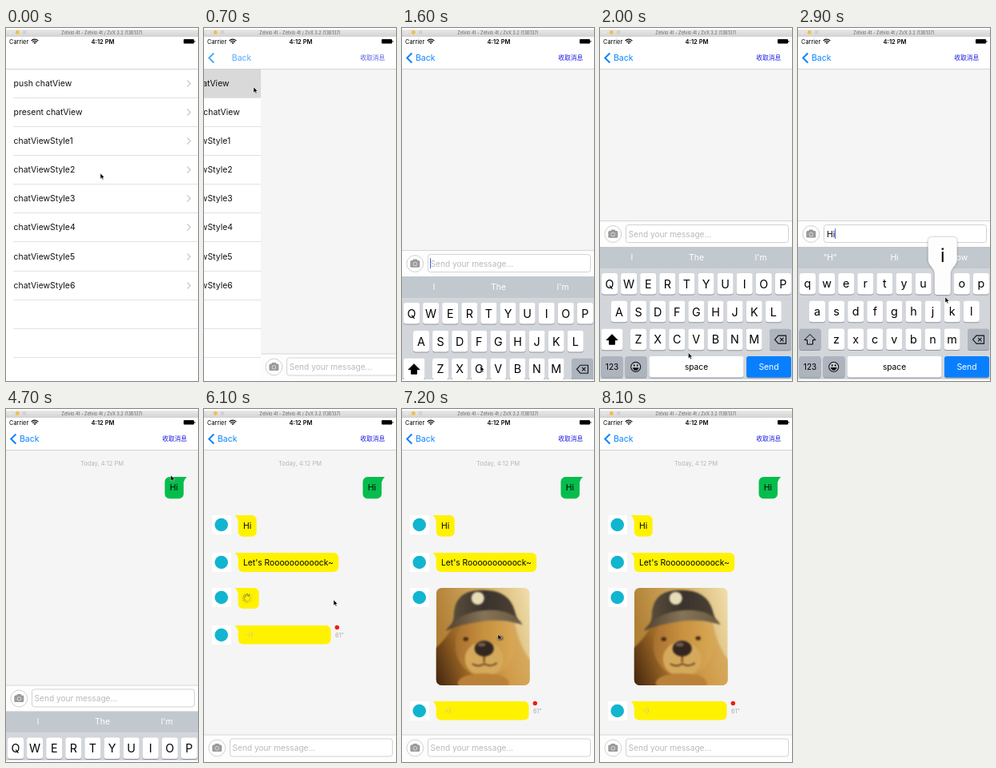
An HTML page with a canvas that plays this animation: 240x442 px, repeating every 8.7 s.

```html
<!DOCTYPE html>
<html lang="en">
<head>
<meta charset="utf-8">
<title>Chat view demo</title>
<style>
  html, body { margin: 0; width: 100%; height: 100%; overflow: hidden; background: #fff; }
  canvas { display: block; width: 100vw; height: 100vh; }
</style>
</head>
<body>
<canvas id="stage"></canvas>
<script>
const W = 240, H = 442, LOOP = 8700, STEP = 100;
const SANS = 'Inter, Roboto, sans-serif';
const CJK = '"Noto Sans CJK SC", "Noto Sans CJK", sans-serif';
const BLUE = '#0a84ff';
const canvas = document.getElementById('stage');
const c = canvas.getContext('2d');

// Moments in ms
const T = { highlight: 500, push: 600, pushEnd: 1000, rise: 1450, typeH: 2600, typeI: 2900,
            send: 3500, fall: 4588, photo: 7200 };
const ARRIVALS = [5100, 5300, 5500, 5700];

// Pointer path: time, x, y
const POINTER = [
  [0, 118, 182], [400, 62, 74], [900, 62, 74], [1300, 98, 423], [1800, 98, 423],
  [2400, 146, 360], [2600, 146, 360], [2800, 184, 337], [2900, 184, 337],
  [3300, 211, 424], [3700, 211, 424], [4400, 194, 163], [4500, 194, 163],
  [4700, 206, 83], [4800, 211, 38], [5800, 211, 38], [6100, 162, 239],
  [6500, 120, 282], [7800, 120, 282], [8000, 160, 414]
];

const clamp = v => Math.max(0, Math.min(1, v));
const smooth = v => v * v * (3 - 2 * v);
const spring = ms => { const u = Math.max(0, ms) * 0.019; return 1 - (1 + u) * Math.exp(-u); };

function text(str, x, y, size, color = '#000', align = 'left', weight = 400, family = SANS) {
  c.font = `${weight} ${size}px ${family}`;
  c.fillStyle = color;
  c.textAlign = align;
  c.fillText(str, x, y);
}
function rect(x, y, w, h, color) { c.fillStyle = color; c.fillRect(x, y, w, h); }
function round(x, y, w, h, r, fill, stroke) {
  c.beginPath();
  c.roundRect(x, y, w, h, r);
  if (fill) { c.fillStyle = fill; c.fill(); }
  if (stroke) { c.strokeStyle = stroke; c.lineWidth = 1; c.stroke(); }
}
function oval(x, y, rx, ry, color) {
  c.beginPath();
  c.ellipse(x, y, rx, ry, 0, 0, 7);
  c.fillStyle = color;
  c.fill();
}
function shape(path, fill, stroke, width = 1) {
  const p = new Path2D(path);
  if (fill) { c.fillStyle = fill; c.fill(p); }
  if (stroke) { c.strokeStyle = stroke; c.lineWidth = width; c.stroke(p); }
}
function at(x, y, draw) { c.save(); c.translate(x, y); draw(); c.restore(); }
function gradient(x0, y0, x1, y1, ...colors) {
  const g = c.createLinearGradient(x0, y0, x1, y1);
  colors.forEach((color, i) => g.addColorStop(i / (colors.length - 1), color));
  return g;
}

function windowChrome() {
  rect(0, 0, W, 2, '#fff');
  rect(0, 2, W, 9, gradient(0, 2, 0, 11, '#e8e8e8', '#d2d2d2'));
  oval(5.5, 5.5, 2.4, 2.4, '#e9e2e1');
  oval(14.3, 5.5, 2.4, 2.4, '#f5bd3e');
  oval(23, 5.5, 2.4, 2.4, '#d0d0d0');
  text('Zelvio 4t - Zelvio 4t / ZvX 3.2 (13B137)', 120, 7.6, 5.6, '#666', 'center');
}

function statusBar() {
  text('Carrier', 4, 19.8, 7.4);
  at(36, 20, () => {
    c.strokeStyle = '#000';
    c.lineWidth = 1.2;
    for (const r of [3.6, 5.8]) {
      c.beginPath();
      c.arc(0, 0, r, -Math.PI * 0.77, -Math.PI * 0.23);
      c.stroke();
    }
    shape('M0 0L-1.6-1.8Q0-2.8 1.6-1.8Z', '#000');
  });
  text('4:12 PM', 121, 19.8, 7.5, '#000', 'center', 600);
  round(222, 14, 13, 5.6, 1, '#000');
  rect(235.4, 15.8, 1, 2, '#000');
}

function navBar(p) {
  rect(0, 11, W, 40, '#fff');
  rect(0, 51, W, 1, '#d2d2d5');
  statusBar();
  c.globalAlpha = p;
  shape('M12.3 31.5L6.3 37.5L12.3 43.5', null, BLUE, 2);
  text('Back', 17 + 60 * (1 - p), 41.4, 10.5, BLUE);
  text('收取消息', 195.3, 40.3, 7.75, '#1a1ae0', 'left', 400, CJK);
  c.globalAlpha = 1;
}

function menu(t) {
  rect(0, 51, W, 389, '#fff');
  if (t >= T.highlight) rect(0, 52, W, 36, '#d9d9d9');
  const rows = ['push chatView', 'present chatView',
    ...[1, 2, 3, 4, 5, 6].map(n => 'chatViewStyle' + n)];
  for (let i = 0; i < 10; i++) {
    const bottom = Math.round(86.95 + i * 36.1);
    rect(9, bottom, 231, 1, '#e2e2e4');
    if (!rows[i]) continue;
    text(rows[i], 9.6, bottom - 14, 10.45, '#111');
    at(226.5, bottom - 17.5, () => shape('M0-4L4 0L0 4', null, '#c7c7cc', 1.2));
  }
}

// Bubble with a pointed corner at the top, on the right for outgoing messages
function bubble(x, y, w, h, color, outgoing) {
  round(x, y, w, h, 6, color);
  const edge = outgoing ? x + w : x, dir = outgoing ? 1 : -1;
  at(edge, y, () => {
    c.scale(dir, 1);
    shape('M-8 0H4Q1 2.5 0 7L-6 8Z', color);
  });
}

function avatar(y) {
  rect(10, y, 24, 24, '#fff');
  oval(21.7, y + 12, 8.3, 8.3, '#12b5cf');
}

function spinner(x, y, t) {
  at(x, y, () => {
    c.lineCap = 'round';
    c.lineWidth = 1.1;
    const lead = Math.floor(t / STEP) % 12;
    for (let i = 0; i < 12; i++) {
      const age = (lead - i + 12) % 12, a = i * Math.PI / 6;
      c.strokeStyle = `rgba(90,90,80,${Math.max(0.25, 0.9 - age * 0.08)})`;
      c.beginPath();
      c.moveTo(Math.sin(a) * 3.2, -Math.cos(a) * 3.2);
      c.lineTo(Math.sin(a) * 5.8, -Math.cos(a) * 5.8);
      c.stroke();
    }
  });
}

// Soft flat picture of a dog in a cap, 117 by 122
function photo() {
  c.beginPath();
  c.roundRect(0, 0, 117, 122, 7);
  c.clip();
  rect(0, 0, 117, 122, gradient(0, 30, 117, 0, '#b08035', '#d2ab62', '#f0dfae'));
  c.filter = 'blur(1.2px)';
  shape('M-4 78Q14 64 22 45L98 42Q104 76 121 94V126H-4Z',
    gradient(0, 110, 117, 70, '#4a2a10', '#a06a26', '#cf9a48', '#d9ad62'));
  oval(61, 72, 37, 40, gradient(24, 0, 98, 0, '#a87030', '#c8923f', '#d8a854'));
  oval(60, 89, 24, 22, '#d5a95c');
  oval(59, 119, 32, 12, '#b98238');
  oval(37, 64, 3.2, 2.6, '#4a2a14');
  oval(80, 63, 3.2, 2.6, '#4a2a14');
  shape('M60 84V93M45 95Q53 100 60 95Q68 100 76 94', null, '#6a431f', 2);
  oval(60, 76, 12, 10, '#33261f');
  oval(57, 71, 5, 2.5, '#6d5c50');
  shape('M22 36Q22 5 52 3Q90 0 98 28L102 42Q60 29 20 46Z',
    gradient(20, 0, 100, 0, '#5a4d3c', '#3a332c', '#4a4034'));
  shape('M12 54Q26 31 61 28Q96 26 108 46Q80 38 57 42Q32 45 12 54Z',
    gradient(12, 0, 108, 0, '#51412f', '#857458', '#6b5940'));
  oval(52, 13, 8, 8, '#e8dcb8');
  c.filter = 'none';
}

function messages(t) {
  if (t < T.send) return;
  text('Today, 4:12 PM', 120, 71.4, 7.5, '#b6b6b8', 'center');
  bubble(198.5, 85, 23.5, 27.3, '#05bd4c', true);
  text('Hi', 204.8, 102.4, 10.4);

  const yellow = '#fff200', loaded = t >= T.photo;
  const received = [
    () => {
      avatar(133);
      bubble(42.7, 133, 23, 26.8, yellow);
      text('Hi', 49, 150, 10.4);
    },
    () => {
      avatar(180);
      bubble(42.7, 180, 125.5, 24, yellow);
      text(`Let's R${'o'.repeat(10)}ck~`, 49, 195.6, 10.3);
    },
    () => {
      avatar(224);
      if (loaded) return at(42.7, 224, photo);
      bubble(42.7, 224, 26, 26, yellow);
      spinner(54, 237, t);
    },
    () => {
      const y = loaded ? 366 : 271;
      avatar(y);
      bubble(42.7, y, 115.8, 23.4, yellow);
      at(53.3, y + 11.7, () => {
        shape('M0-1L1.5 0L0 1Z', '#d0c88a');
        shape('M3-2.2Q5 0 3 2.2M6-3.5Q9 0 6 3.5', null, '#d0c88a', 1);
      });
      oval(166.3, y + 2.5, 2.7, 2.7, '#f01c0c');
      text('61"', 164, y + 14.5, 7.3, '#aaa');
    }
  ];
  received.forEach((draw, i) => { if (t >= ARRIVALS[i]) draw(); });
}

function inputBar(top, t, focused) {
  rect(0, top, W, 33, '#fdfdfd');
  rect(0, top, W, 1, '#d4d4d6');
  oval(16.3, top + 17, 10.4, 10.4, '#fff');
  c.strokeStyle = '#cfcfcf';
  c.lineWidth = 1;
  c.stroke();
  round(10.3, top + 13, 12, 8.6, 1.5, '#9a9a9a');
  round(13.5, top + 11.5, 5.6, 3, 1, '#9a9a9a');
  oval(16.3, top + 17.3, 2.6, 2.6, '#e4e4e4');
  oval(16.3, top + 17.3, 1.9, 1.9, '#9a9a9a');
  round(32.5, top + 5.5, 203, 22, 3, '#fff', '#d2d2d4');

  const typed = typedText(t);
  if (typed) text(typed, 36, top + 20.7, 10.3);
  else text('Send your message...', 35.6, top + 20.7, 10.15, '#b9b9be');
  const lit = (t - 1500) % 1000 < 500;
  if (focused && (lit || typed)) {
    const x = typed ? 36 + c.measureText(typed).width : 35;
    rect(x, top + 10, 1, 13, '#3f6be0');
  }
}

function typedText(t) {
  if (t < T.typeH || t >= T.send) return '';
  return t < T.typeI ? 'H' : 'Hi';
}

function suggestions(t) {
  if (t < T.typeH || t >= T.send) return ['I', 'The', "I'm"];
  return t <= T.typeI ? ['“H”', 'Hi', 'How'] : ['“Hi”', 'Him', 'High'];
}

function key(x, y, w, fill = '#fff') {
  round(x, y + 1, w, 26.5, 3, '#8f9499');
  round(x, y, w, 26.5, 3, fill);
}

// Enlarged balloon above a pressed key; x is the key's centre, y its top
function popup(letter, x, y) {
  at(x, y, () => {
    c.shadowColor = 'rgba(0,0,0,.35)';
    c.shadowBlur = 3;
    shape('M-13-45H13Q18-45 18-40V-17C18-9 10-7 10 1V24Q10 27 7 27H-7Q-10 27-10 24V1C-10-7-18-9-18-17V-40Q-18-45-13-45Z', '#fdfdfd');
    c.shadowColor = 'transparent';
    text(letter, 0, -14, 23, '#000', 'center');
  });
}

function keyboard(top, t) {
  const caps = !typedText(t), gray = '#adb4be';
  rect(0, top, W, 27, '#c1c8ce');
  rect(0, top + 27, W, 170, '#d2d6db');
  suggestions(t).forEach((s, i) => text(s, 40 + i * 80.5, top + 16.5, 10.4, '#fff', 'center'));

  const pressed = t === 2500 ? 'H' : t >= 2800 && t <= 2900 ? 'I' : '';
  let balloon = null;
  ['QWERTYUIOP', 'ASDFGHJKL', 'ZXCVBNM'].forEach((letters, row) => {
    const y = top + 33 + row * 34.8, first = [12, 24, 48][row];
    [...letters].forEach((letter, i) => {
      const x = first + i * 24.1, label = caps ? letter : letter.toLowerCase();
      key(x - 10, y, 20);
      if (letter === pressed) balloon = () => popup(label, x, y);
      else text(label, x, y + (caps ? 18.7 : 18), 14.3, '#000', 'center');
    });
  });

  const y3 = top + 102.6, y4 = top + 137;
  key(1.5, y3, 27, caps ? '#fff' : gray);
  at(15, y3 + 13.5, () =>
    shape('M0-6.5L7 .5H3.5V6H-3.5V.5H-7Z', caps ? '#000' : null, '#000', 1));
  key(212, y3, 27, gray);
  at(225.5, y3 + 13.5, () => {
    shape('M-7 0L-2.5-5H7V5H-2.5Z', null, '#111', 1.1);
    shape('M-.5-2.3L4 2.3M4-2.3L-.5 2.3', null, '#111', 1.1);
  });

  key(1.5, y4, 27, gray);
  text('123', 15, y4 + 17, 10, '#000', 'center');
  key(31.5, y4, 27, gray);
  at(44.7, y4 + 13.3, () => {
    oval(0, 0, 6, 6, '#c7ccd2');
    c.strokeStyle = '#111';
    c.lineWidth = 1.1;
    c.stroke();
    oval(-2, -1.8, 0.9, 1.2, '#111');
    oval(2, -1.8, 0.9, 1.2, '#111');
    shape('M-4 .8H4Q3 4.5 0 4.5Q-3 4.5-4 .8Z', '#111');
  });
  key(61.5, y4, 118);
  text('space', 120.5, y4 + 16.5, 10.2, '#000', 'center');
  key(183, y4, 56, '#087fff');
  text('Send', 211, y4 + 16.8, 10.4, '#fff', 'center');
  if (balloon) balloon();
}

function chat(t) {
  rect(0, 51, W, 389, '#f5f5f5');
  const open = spring(t - T.rise) - spring(t - T.fall);
  const top = 440.5 - 166.5 * open;
  messages(t);
  inputBar(top - 33, t, t > T.rise && t < T.fall);
  if (open > 0.002) keyboard(top, t);
}

function pointer(t) {
  const next = POINTER.findIndex(p => p[0] > t);
  const last = POINTER[POINTER.length - 1];
  if (t > last[0]) return;
  const b = next < 0 ? last : POINTER[next], a = next < 0 ? last : POINTER[next - 1];
  const p = a === b ? 0 : smooth((t - a[0]) / (b[0] - a[0]));
  at(a[1] + (b[1] - a[1]) * p, a[2] + (b[2] - a[2]) * p, () =>
    shape('M0 0V7L1.7 5.5L2.8 8L4 7.4L2.9 5H5Z', '#000', 'rgba(255,255,255,.75)', 0.6));
}

function draw(t) {
  rect(0, 0, W, H, '#fff');
  c.save();
  c.beginPath();
  c.rect(0, 0, W, 440);
  c.clip();
  const u = clamp((t - T.push + 50) / (T.pushEnd - T.push + 50));
  const p = t < T.push ? 0 : 1 - (1 - u) ** 3;
  if (p < 1) at(-72 * p, 0, () => menu(t));
  if (p > 0) at(W * (1 - p), 0, () => chat(t));
  navBar(p);
  windowChrome();
  pointer(t);
  c.restore();
}

function frame() {
  const dpr = window.devicePixelRatio || 1;
  const w = Math.round(W * dpr), h = Math.round(H * dpr);
  if (canvas.width !== w || canvas.height !== h) { canvas.width = w; canvas.height = h; }
  c.setTransform(dpr, 0, 0, dpr, 0, 0);
  const t = performance.now() % LOOP;
  draw(Math.floor(t / STEP) * STEP);
  requestAnimationFrame(frame);
}
frame();
</script>
</body>
</html>
```
